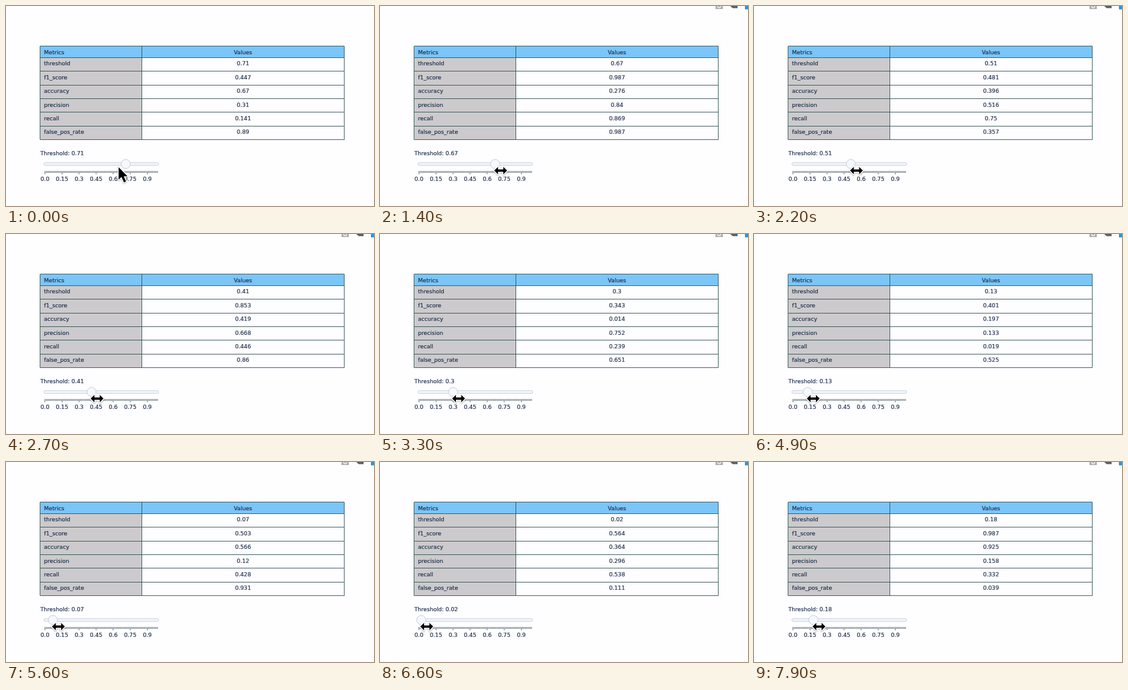
These frames come from a looping animation (600 px wide and 327 px high, 8 s). An HTML page with a canvas:

```html
<!DOCTYPE html>
<html lang="en">
<head>
<meta charset="utf-8">
<title>Threshold slider</title>
<style>
html, body { margin: 0; width: 100%; height: 100%; overflow: hidden; background: #fefdff; }
canvas { display: block; width: 600px; height: 327px; }
</style>
</head>
<body>
<canvas id="stage" width="600" height="327"></canvas>
<script>
const ctx = document.getElementById('stage').getContext('2d');
const LOOP = 8000, STEP = 100;
const PAPER = '#fefdff', TEXT = '#1f2f4a', LINE = '#2f4f4f', EDGE = '#bec8d9', GRIP = '#f5f8fc';
const METRICS = ['threshold', 'f1_score', 'accuracy', 'precision', 'recall', 'false_pos_rate'];
const LEFT = 55.9, SPLIT = 221.3, RIGHT = 551.5, TOP = 65.6, BODY = 84.2, ROW = 22.4;

// Key points of the drag: [time, threshold]
const DRAG = [
  [1200, 0.71], [2200, 0.51], [3300, 0.3], [4200, 0.18],
  [5600, 0.07], [6600, 0.02], [6900, 0.02], [7900, 0.18]
];

const clamp01 = v => Math.min(1, Math.max(0, v));
const lerp = (a, b, k) => a + (b - a) * k;
const progress = (t, from, to) => clamp01((t - from) / (to - from));
const crisp = v => Math.floor(v) + 0.5;
const sliderX = v => 63.5 + v * 185.4;

function thresholdAt(t) {
  let i = 0;
  while (i < DRAG.length - 2 && t > DRAG[i + 1][0]) i++;
  const [t1, v1] = DRAG[i], [t2, v2] = DRAG[i + 1];
  return Math.round(lerp(v1, v2, progress(t, t1, t2)) * 100) / 100;
}

// Each threshold seeds its own repeatable scores, to three decimals.
function score(value, index) {
  const s = Math.sin(value * 1298.98 + index * 78.233) * 43758.5453;
  return Math.floor((s - Math.floor(s)) * 1000) / 1000;
}

function text(str, x, y, align = 'left') {
  ctx.fillStyle = ctx.strokeStyle = TEXT;
  ctx.lineWidth = 0.2;
  ctx.textAlign = align;
  ctx.fillText(str, x, y);
  ctx.strokeText(str, x, y);
}

function rect(color, x, y, w, h) {
  ctx.fillStyle = color;
  ctx.fillRect(x, y, w, h);
}

function disc(color, x, y, r) {
  ctx.fillStyle = color;
  ctx.beginPath();
  ctx.arc(x, y, r, 0, Math.PI * 2);
  ctx.fill();
}

function segment(x1, y1, x2, y2) {
  ctx.beginPath();
  ctx.moveTo(x1, y1);
  ctx.lineTo(x2, y2);
  ctx.stroke();
}

function polygon(points) {
  ctx.beginPath();
  points.forEach(([x, y]) => ctx.lineTo(x, y));
  ctx.closePath();
}

function drawTable(value) {
  const bottom = BODY + ROW * METRICS.length;
  const center = (SPLIT + RIGHT) / 2;
  rect('#7bc5f8', LEFT, TOP, RIGHT - LEFT, BODY - TOP);
  rect('#cccacc', LEFT, BODY, SPLIT - LEFT, bottom - BODY);

  ctx.strokeStyle = LINE;
  ctx.lineWidth = 0.9;
  const rule = y => segment(LEFT, crisp(y), RIGHT, crisp(y));
  rule(TOP);
  for (let i = 0; i <= METRICS.length; i++) rule(BODY + i * ROW);
  [LEFT, SPLIT, RIGHT].forEach(x => segment(crisp(x), TOP, crisp(x), bottom));

  text('Metrics', 62, 78.6);
  text('Values', center, 78.6, 'center');
  METRICS.forEach((name, i) => {
    const y = 97.3 + i * ROW;
    text(name, 62, y);
    text(String(i ? score(value, i) : value), center, y, 'center');
  });
}

function drawSlider(value) {
  text('Threshold: ' + value, 56, 244);
  for (let i = 0; i < 100; i++) {
    const x = sliderX(i / 100), major = i % 15 === 0;
    rect(LINE, x - 0.4, 269.8, 0.8, major ? 5.2 : 3);
    if (major) text(i ? String(i / 100) : '0.0', x, 286.3, 'center');
  }

  ctx.fillStyle = GRIP;
  ctx.strokeStyle = EDGE;
  ctx.lineWidth = 0.9;
  ctx.beginPath();
  ctx.roundRect(61.8, 256.2, 187, 4.2, 2.1);
  ctx.fill();
  ctx.stroke();
  disc(GRIP, sliderX(value), 258.3, 7.5);
  ctx.stroke();
}

function drawToolbar(alpha) {
  ctx.globalAlpha = alpha;
  rect('#b0b0b2', 547, 0, 12, 5);
  disc(PAPER, 553, 0.5, 3);
  disc('#b0b0b2', 553, 0.5, 1.8);
  ctx.fillStyle = '#5d5d60';
  polygon([[571, 0], [583, 0], [583, 3.6], [575, 3.6]]);
  ctx.fill();
  rect('#1e96ee', 595, 0, 5, 5.5);
  ctx.globalAlpha = 1;
}

function drawPointer(x, y, points) {
  ctx.save();
  ctx.translate(x, y);
  polygon(points);
  ctx.lineJoin = 'round';
  ctx.lineWidth = 3;
  ctx.strokeStyle = '#fff';
  ctx.shadowColor = 'rgba(0, 0, 0, 0.35)';
  ctx.shadowBlur = 2;
  ctx.shadowOffsetY = 0.8;
  ctx.stroke();
  ctx.shadowColor = 'transparent';
  ctx.fillStyle = '#000';
  ctx.fill();
  ctx.restore();
}

const ARROW = [[0, 0], [0, 20.5], [4.6, 16.2], [8.8, 25], [12.2, 23.4], [8.3, 15], [14.6, 15]];
const HALF = [[-10.5, 0], [-4.3, -6.2], [-4.3, -1.8]];
const mirror = (points, sx, sy) => points.map(([x, y]) => [x * sx, y * sy]);
const RESIZE = [
  ...HALF, ...mirror(HALF, -1, 1).reverse(),
  ...mirror(HALF, -1, -1), ...mirror(HALF, 1, -1).reverse()
];

function draw(time) {
  const t = Math.floor((time % LOOP) / STEP) * STEP;
  const value = thresholdAt(t);
  const hoverX = sliderX(value) + 9;
  const approach = progress(t, 500, 1000);
  rect(PAPER, 0, 0, 600, 327);
  ctx.font = '9.1px Verdana, "DejaVu Sans", sans-serif';
  drawTable(value);
  drawSlider(value);
  drawToolbar(progress(t, 500, 800));
  const x = lerp(183.6, hoverX, approach);
  if (approach < 0.6) {
    drawPointer(x, lerp(263.4, 269, approach), ARROW);
  } else {
    rect('rgba(255, 255, 255, 0.7)', x - 3.5, 261.5, 7, 14);
    drawPointer(x, 269.1, RESIZE);
  }
}

const start = performance.now();
function tick() {
  draw(performance.now() - start);
  requestAnimationFrame(tick);
}
tick();
</script>
</body>
</html>
```
